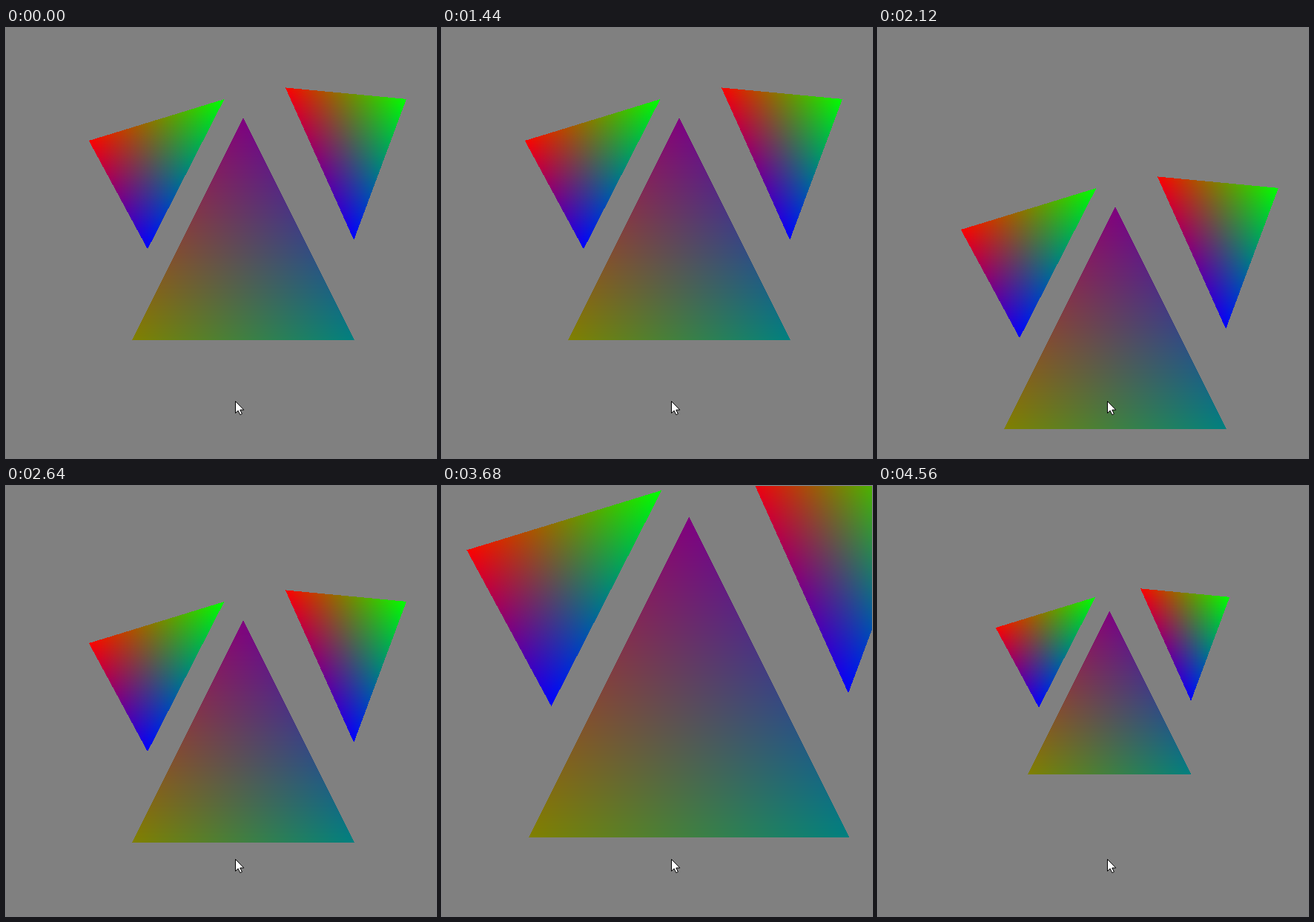
An HTML page with a canvas for the animation above (5040 ms loop, 580 by 580 pixels).

```html
<!DOCTYPE html>
<html lang="en">
<head>
<meta charset="utf-8">
<title>Triangle transforms</title>
<style>
  html, body { margin: 0; width: 100%; height: 100%; overflow: hidden; background: #808080; }
  canvas, svg { position: absolute; left: 0; top: 0; width: 580px; height: 580px; }
</style>
</head>
<body>
<canvas id="stage" width="580" height="580"></canvas>
<svg viewBox="0 0 580 580">
  <path d="M309.5 503.5v16l3.6-3.4 2.7 5.6 2.6-1.2-2.6-5.4h5z" fill="#fff" stroke="#000"/>
</svg>
<script>
const SIZE = 580, LOOP = 5040, CENTER = { x: 290, y: 301 };
const ctx = document.getElementById('stage').getContext('2d');

const RGB = [[255, 0, 0], [0, 255, 0], [0, 0, 255]];
const MUTED = [[128, 0, 128], [128, 128, 0], [0, 128, 128]];
const triangles = [
  { points: [[320, 121], [170, 421], [470, 421]], colors: MUTED },
  { points: [[111.8, 152], [294.4, 96], [191, 298.3]], colors: RGB },
  { points: [[376.8, 80.4], [540, 95.9], [469.2, 286]], colors: RGB }
];

// Each step holds until the next one: start time, shift, scale.
const steps = [
  { at: 0 },
  { at: 1000, dx: -60 },
  { at: 1440 },
  { at: 1920, dy: 60 },
  { at: 2120, dy: 120 },
  { at: 2640, dy: 60 },
  { at: 2840 },
  { at: 3360, scale: 1.2 },
  { at: 3680, scale: 1.2 ** 2 },
  { at: 4160, scale: 1.2 ** 2 * 0.8 },
  { at: 4360, scale: 1.2 ** 2 * 0.8 ** 2 },
  { at: 4560, scale: 1.2 ** 2 * 0.8 ** 3 }
];

// Blends the corner colours by barycentric weights.
function fillTriangle(data, [a, b, c], colors) {
  const xs = [a[0], b[0], c[0]], ys = [a[1], b[1], c[1]];
  const low = v => Math.max(0, Math.floor(Math.min(...v)));
  const high = v => Math.min(SIZE, Math.ceil(Math.max(...v)));
  const cross = (p, q, x, y) => (q[0] - p[0]) * (y - p[1]) - (q[1] - p[1]) * (x - p[0]);
  const area = cross(a, b, c[0], c[1]);
  for (let y = low(ys); y < high(ys); y++) {
    for (let x = low(xs); x < high(xs); x++) {
      const px = x + 0.5, py = y + 0.5;
      const u = cross(b, c, px, py) / area;
      const v = cross(c, a, px, py) / area;
      const w = 1 - u - v;
      if (u < 0 || v < 0 || w < 0) continue;
      const i = (y * SIZE + x) * 4;
      for (let k = 0; k < 3; k++) {
        data[i + k] = u * colors[0][k] + v * colors[1][k] + w * colors[2][k];
      }
    }
  }
}

function draw({ dx = 0, dy = 0, scale = 1 }) {
  ctx.fillStyle = '#808080';
  ctx.fillRect(0, 0, SIZE, SIZE);
  const image = ctx.getImageData(0, 0, SIZE, SIZE);
  const place = ([x, y]) => [
    CENTER.x + (x - CENTER.x) * scale + dx,
    CENTER.y + (y - CENTER.y) * scale + dy
  ];
  for (const { points, colors } of triangles) {
    fillTriangle(image.data, points.map(place), colors);
  }
  ctx.putImageData(image, 0, 0);
}

const start = performance.now();
let shown = null;
function tick() {
  const time = (performance.now() - start) % LOOP;
  const step = steps.filter(s => s.at <= time).pop();
  if (step !== shown) draw(shown = step);
  requestAnimationFrame(tick);
}
tick();
</script>
</body>
</html>
```
